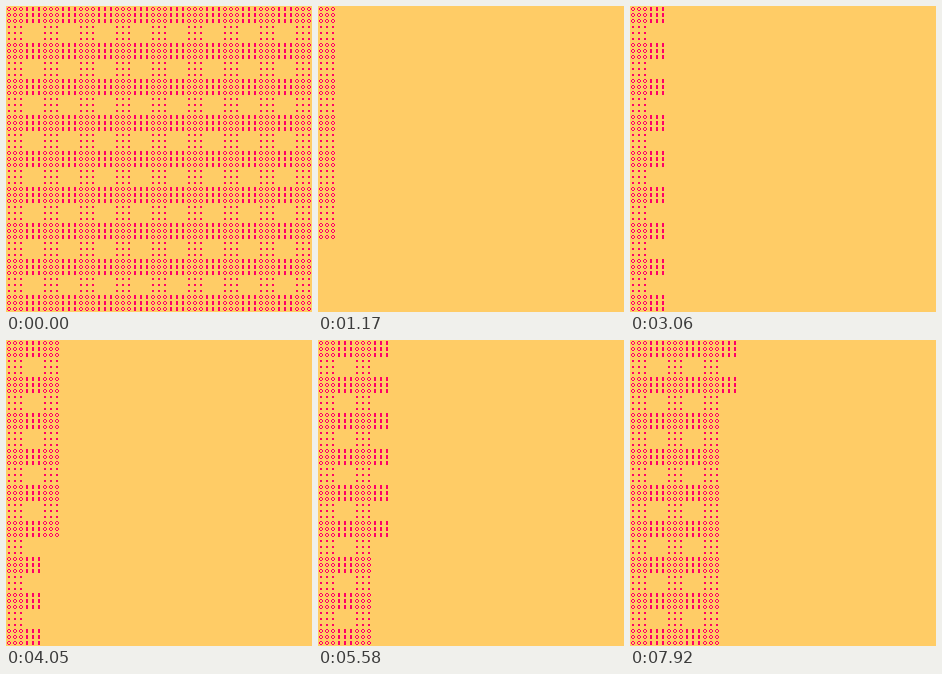
These frames come from a looping animation (306x306 px, 8 s). An HTML page with a canvas:

```html
<!DOCTYPE html>
<html lang="en">
<head>
<meta charset="utf-8">
<title>Woven pattern</title>
<style>
  html, body { margin: 0; width: 100%; height: 100%; overflow: hidden; background: #fc6; }
  canvas { display: block; }
</style>
</head>
<body>
<canvas width="306" height="306"></canvas>
<script>
const LOOP = 8000, STEP = 90;
const COUNT = 17, BLOCK = 18, CELL = 6;
const ctx = document.querySelector('canvas').getContext('2d');

// Each motif is a few rectangles [x, y, w, h] inside a 6px cell.
const ring = [[2, 1, 2, 1], [2, 4, 2, 1], [1, 2, 1, 2], [4, 2, 1, 2]];
const bar = [[2, 1, 2, 4]];
const dot = [[2, 2, 2, 2]];

function motif(col, row) {
  if (col % 2) return row % 2 ? [] : bar;
  return row % 2 ? dot : ring;
}

function drawBlock(col, row) {
  for (let x = 0; x < BLOCK; x += CELL) {
    for (let y = 0; y < BLOCK; y += CELL) {
      for (const [dx, dy, w, h] of motif(col, row)) {
        ctx.fillRect(col * BLOCK + x + dx, row * BLOCK + y + dy, w, h);
      }
    }
  }
}

// Blocks fill column by column; the loop opens on the finished pattern.
function draw(step) {
  const shown = step || COUNT * COUNT;
  ctx.fillStyle = '#fc6';
  ctx.fillRect(0, 0, 306, 306);
  ctx.fillStyle = '#f06';
  for (let i = 0; i < shown; i++) drawBlock(Math.floor(i / COUNT), i % COUNT);
}

const start = performance.now();
let last = 0;
draw(0);

function tick() {
  const step = Math.floor((performance.now() - start) % LOOP / STEP);
  if (step !== last) draw(last = step);
  requestAnimationFrame(tick);
}
requestAnimationFrame(tick);
</script>
</body>
</html>
```
